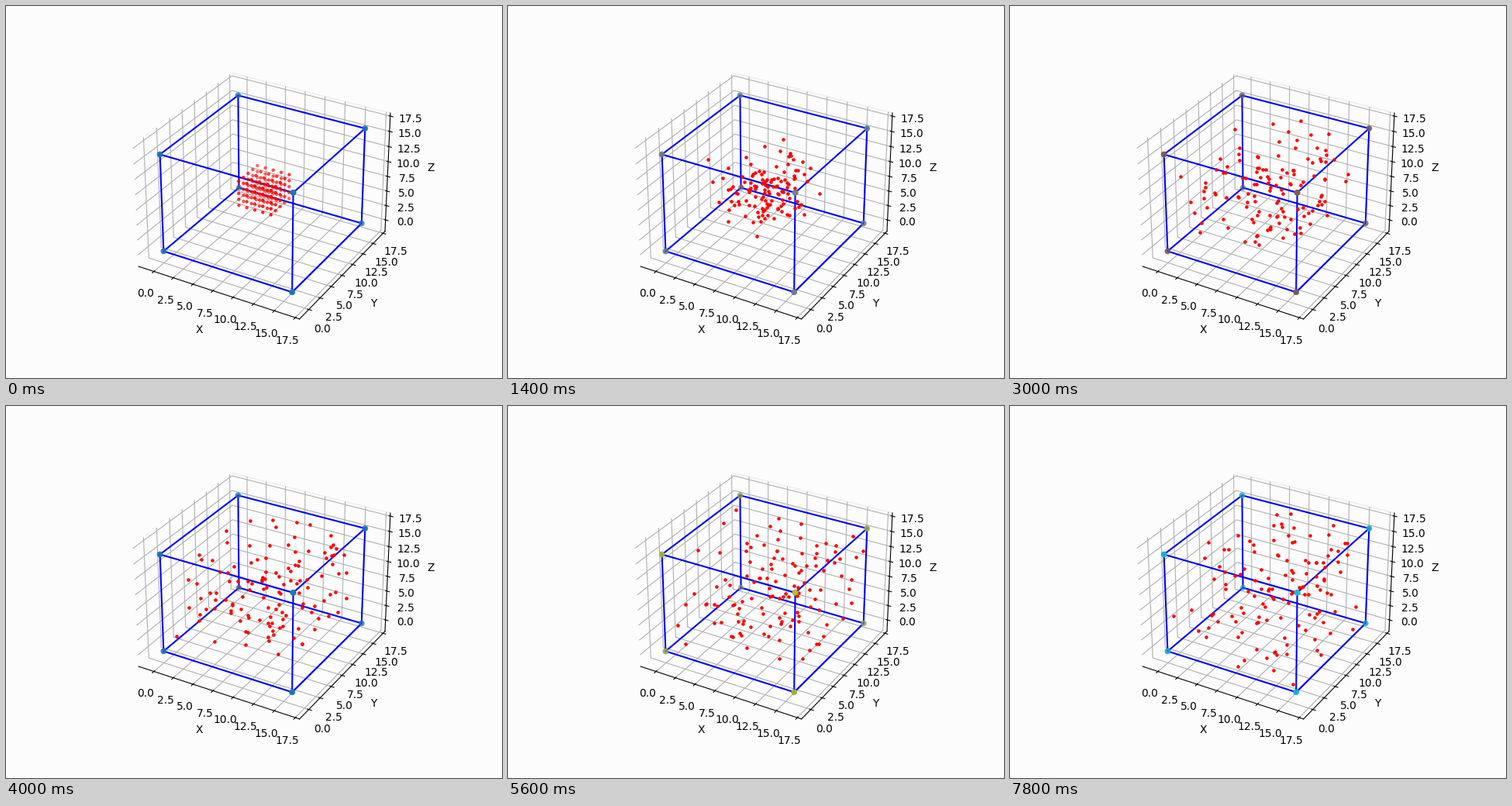
A matplotlib script that plays this animation: 640x480 px, repeating every 8 s.

```python
import itertools

import matplotlib.pyplot as plt
import numpy as np
from matplotlib.animation import FuncAnimation

SIDE = 16
FRAMES = 40
PAPER = "#fcfcfc"

rng = np.random.default_rng(12)
start = np.array(list(itertools.product(range(6, 11), repeat=3)), float)
velocity = rng.normal(0, 0.28, start.shape)
corners = np.array(list(itertools.product((0, SIDE), repeat=3)))


def positions(i):
    """Free flight folded back at the walls of the box."""
    free = start + velocity * i
    return SIDE - np.abs(free % (2 * SIDE) - SIDE)


fig = plt.figure(figsize=(6.4, 4.8), dpi=100, facecolor=PAPER)
ax = fig.add_subplot(projection="3d", facecolor=PAPER)
ax.set(xlim=(-2, 18), ylim=(-2, 18), zlim=(-2, 18),
       xlabel="X", ylabel="Y", zlabel="Z")
for axis in (ax.xaxis, ax.yaxis, ax.zaxis):
    axis.set_pane_color(PAPER)
ax.yaxis.pane.set_edgecolor("#eeeeee")

for a, b in itertools.combinations(corners, 2):
    if np.count_nonzero(a != b) == 1:
        ax.plot(*zip(a, b), color="b")
ax.scatter(*corners.T, color="C0")

moving = []


def update(i):
    while moving:
        moving.pop().remove()
    moving.append(ax.scatter(*corners.T, color=f"C{i % 10}"))
    moving.append(ax.scatter(*positions(i).T, color="r", marker=".",
                             depthshade=i == 0))
    return moving


anim = FuncAnimation(fig, update, frames=FRAMES, interval=200,
                     init_func=lambda: update(0), repeat=True,
                     repeat_delay=0, blit=False)
plt.show()
```
